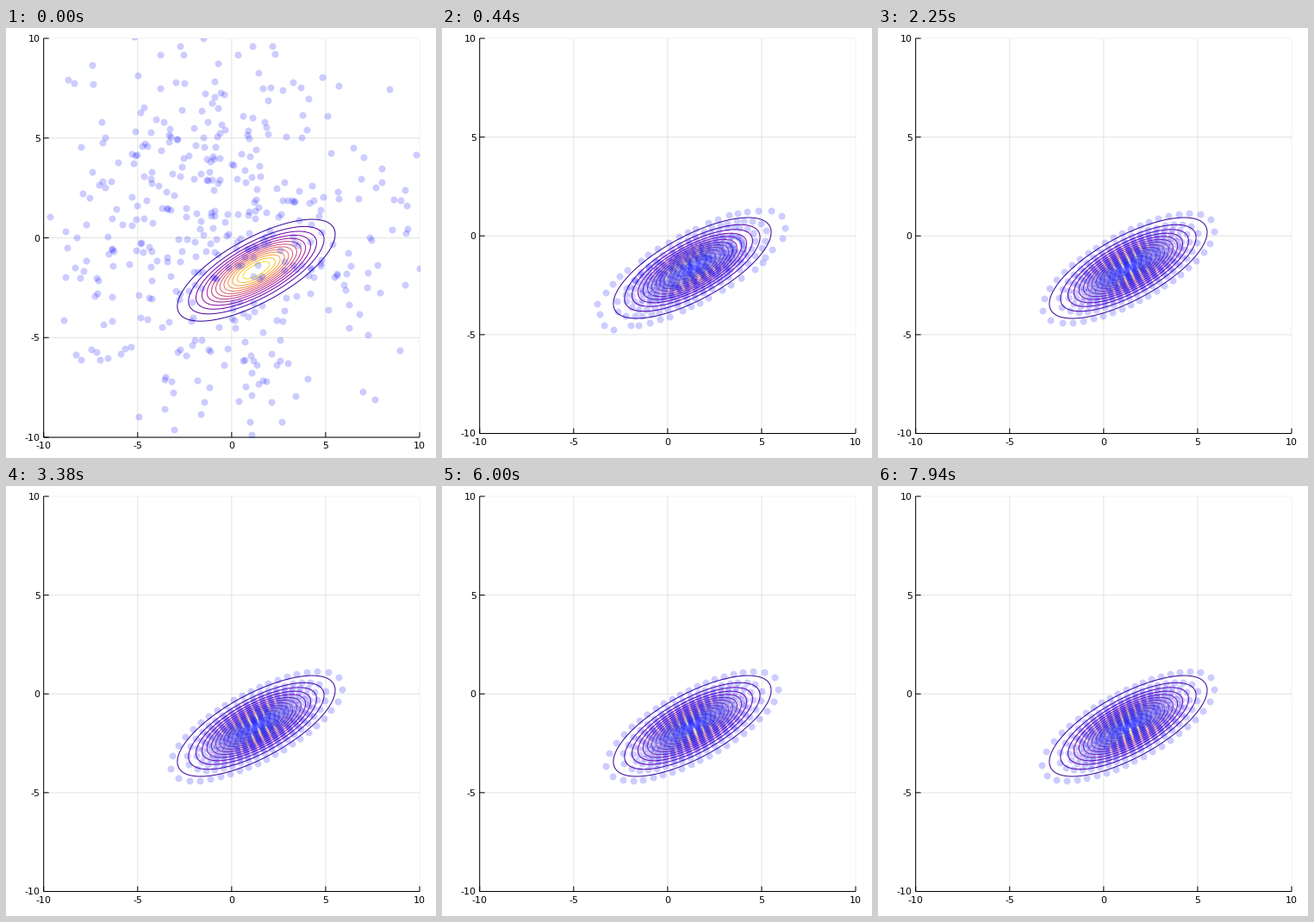
Write a matplotlib script that moves like this. It is 499 px wide and 499 px high and loops after 8 s.

```python
import numpy as np
import matplotlib.pyplot as plt
from matplotlib.animation import FuncAnimation
from matplotlib.patches import Rectangle

SIZE, DPI = 499, 64
PT = 72 / DPI                      # points per pixel
LEFT, RIGHT, TOP = 43.7, 480, 12
STEP = 62.5                        # ms between particle updates
FRAMES, INTERVAL = 200, 40
RINGS = 21
COUNT = RINGS ** 2                 # ring j holds 2j + 1 dots
LEVELS = 14

# Gaussian the particles settle on
MEAN = np.array([1.31, -1.625])
AXES = np.array([2.017, 0.71])
TILT = np.radians(26.9)
ROT = np.array([[np.cos(TILT), -np.sin(TILT)], [np.sin(TILT), np.cos(TILT)]])
RATE = np.array([0.37, 1.1])       # decay per update along each axis
SQUEEZE = np.array([1, 0.97])

rng = np.random.default_rng(8)


def to_px(points, bottom):
    x = LEFT + (points[:, 0] + 10) * (RIGHT - LEFT) / 20
    y = TOP + (10 - points[:, 1]) * (bottom - TOP) / 20
    return np.column_stack([x, y])


def ellipse(radius, theta):
    """Points in the Gaussian's own axes."""
    circle = np.column_stack([np.cos(theta), np.sin(theta)])
    return AXES * circle * np.reshape(radius, (-1, 1))


def ring_angles(n, phase, power):
    """Spread n dots round an ellipse, sparser at its tips as power grows."""
    t = np.linspace(-np.pi, np.pi, 721)
    speed = np.hypot(AXES[0] * np.sin(t), AXES[1] * np.cos(t)) ** power
    arc = np.concatenate([[0], np.cumsum((speed[1:] + speed[:-1]) / 2)])
    return np.interp((np.arange(n) + phase) / n, arc / arc[-1], t)


def build():
    """Pair each start point with the ring place of the same rank and angle."""
    begin = rng.normal([-0.2, 0.3], [4.5, 4.8], (COUNT, 2))
    rel = (begin - begin.mean(axis=0)) @ ROT
    by_radius = np.argsort(np.hypot(rel[:, 0], rel[:, 1]))
    angle = np.arctan2(rel[:, 1], rel[:, 0])
    order, radius, theta = [], [], []
    for j in range(RINGS):
        n = 2 * j + 1
        edge = j / (RINGS - 1)
        members = by_radius[j * j:j * j + n]
        order.append(members[np.argsort(angle[members])])
        share = (j * j + j + 0.5) / COUNT
        r = 1.015 * np.sqrt(-2 * np.log(1 - share))
        wobble = 0.05 * (1 - edge)
        radius.append(r * (1 + wobble * rng.normal(size=n)))
        theta.append(ring_angles(n, (0.8 + 0.5 * (RINGS - 1 - j)) % 1,
                                 1.3 * edge ** 3))
    begin = begin[np.concatenate(order)]
    return (begin - MEAN) @ ROT, np.concatenate(radius), np.concatenate(theta)


START, RADIUS, THETA = build()


def particles(k):
    creep = 0.11 * max(0, (k - 40) / 87)
    goal = SQUEEZE * ellipse(RADIUS, THETA - creep * (1 - np.cos(THETA)) / 2)
    return MEAN + (goal + (START - goal) * np.exp(-RATE * k)) @ ROT.T


fig = plt.figure(figsize=(SIZE / DPI, SIZE / DPI), dpi=DPI, facecolor="white")
ax = fig.add_axes([0, 0, 1, 1])
ax.set_xlim(0, SIZE)
ax.set_ylim(SIZE, 0)
ax.axis("off")


def stroke(color, z):
    return ax.plot([], [], color=color, lw=PT, zorder=z, snap=False,
                   solid_capstyle="butt")[0]


def label(value, ha):
    return ax.text(0, 0, str(value), ha=ha, va="center_baseline",
                   fontsize=11 * PT, family="DejaVu Sans", color="black")


VALUES = range(-10, 11, 5)
x_grid = [stroke("#e3e3e3", 0) for _ in VALUES]
y_grid = [stroke("#e3e3e3", 0) for _ in VALUES]
x_ticks = [stroke("black", 1) for _ in VALUES]
y_ticks = [stroke("black", 1) for _ in VALUES]
x_text = [label(v, "center") for v in VALUES]
y_text = [label(v, "right") for v in VALUES]
x_axis, y_axis = stroke("black", 1), stroke("black", 1)

contours = [stroke(plt.cm.plasma(i / LEVELS), 2) for i in range(1, LEVELS)]
dots = ax.scatter([], [], s=(8 * PT) ** 2, c=[(0, 0, 1, 0.2)],
                  linewidths=0, zorder=3)
plot_box = Rectangle((LEFT, TOP), RIGHT - LEFT, 1, transform=ax.transData)


def set_layout(bottom):
    for i, v in enumerate(VALUES):
        x, y = to_px(np.array([[v, v]]), bottom)[0]
        x_grid[i].set_data([x, x], [TOP, bottom])
        y_grid[i].set_data([LEFT, RIGHT], [y, y])
        x_ticks[i].set_data([x, x], [bottom - 6, bottom])
        y_ticks[i].set_data([LEFT, LEFT + 6], [y, y])
        x_text[i].set_position((x, bottom + 9.5))
        y_text[i].set_position((LEFT - 4, y))
    for line in (x_grid[-1], y_grid[-1]):
        line.set_color("#f2f2f2")
    x_axis.set_data([LEFT, RIGHT], [bottom, bottom])
    y_axis.set_data([LEFT, LEFT], [TOP, bottom])
    turn = np.linspace(0, 2 * np.pi, 121)
    for i, line in enumerate(contours, 1):
        r = np.sqrt(2 * np.log(LEVELS / i))
        line.set_data(*to_px(MEAN + ellipse(r, turn) @ ROT.T, bottom).T)
    plot_box.set_height(bottom - TOP)
    dots.set_clip_path(plot_box)


def update(frame):
    k = int(frame * INTERVAL / STEP)
    bottom = 475 if k == 0 else 470.5
    set_layout(bottom)
    dots.set_offsets(to_px(particles(k), bottom))
    return [dots]


anim = FuncAnimation(fig, update, frames=FRAMES, interval=INTERVAL,
                     init_func=lambda: update(0), repeat=True,
                     repeat_delay=0, blit=False)
plt.show()
```
